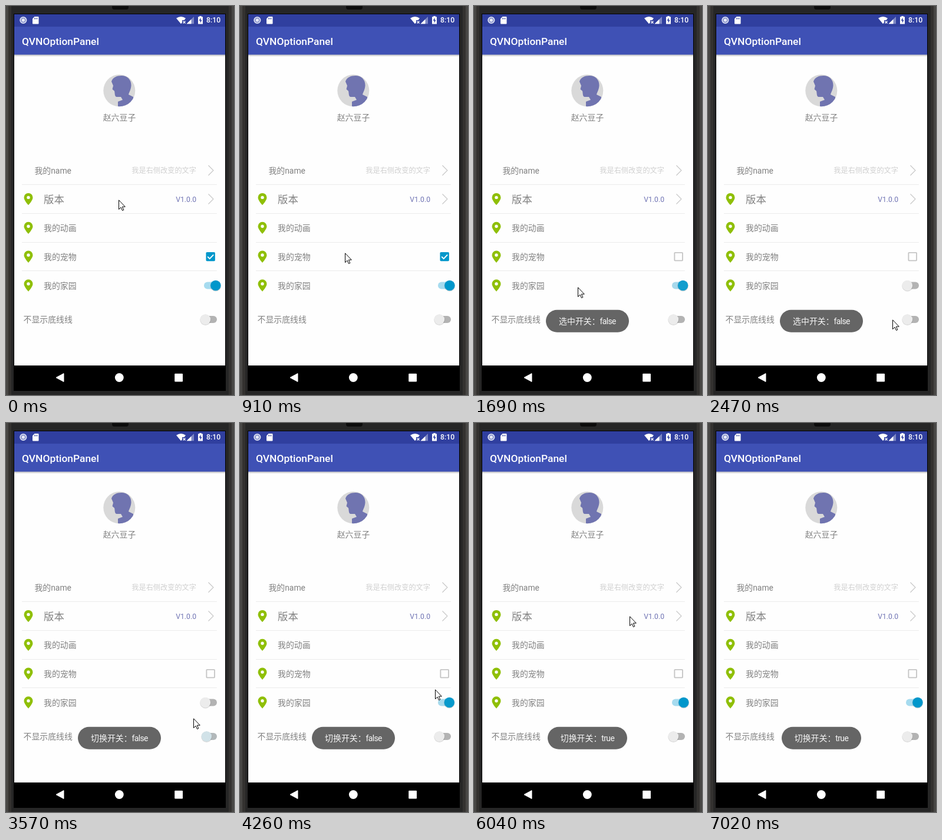
An HTML page that plays this animation: 387 by 659 pixels, repeating every 7.12 s.

```html
<!DOCTYPE html>
<html lang="zh-CN">
<head>
<meta charset="utf-8">
<title>Settings demo</title>
<style>
  html, body { margin: 0; width: 100%; height: 100%; overflow: hidden; background: #262626; }
  svg { display: block; width: 387px; height: 659px; }
  text { font: 13.9px Roboto, "Noto Sans CJK SC", "Noto Sans CJK", sans-serif; fill: #808080; }
  .title { font-size: 17.4px; font-weight: 500; fill: #fff; }
  .clock { font-size: 12.3px; font-weight: 500; fill: #fff; }
  .big { font-size: 17.4px; }
  .value { font-size: 12.2px; fill: #d0d0d0; text-anchor: end; }
  .version { fill: #7074b4; }
  .mid { text-anchor: middle; }
  .toast text { fill: #f6f6f6; text-anchor: middle; }
  .toast tspan { letter-spacing: -.6px; }
</style>
</head>
<body>
<svg viewBox="0 0 387 659" xmlns="http://www.w3.org/2000/svg">
  <defs>
    <linearGradient id="shade" x2="0" y2="1">
      <stop stop-color="#000" stop-opacity=".25"/>
      <stop offset="1" stop-color="#000" stop-opacity="0"/>
    </linearGradient>
    <clipPath id="round"><circle cx="192.3" cy="143.3" r="27"/></clipPath>
    <path id="pin" fill="#8fbf06" fill-rule="evenodd"
      d="M0 10.3C-2 8-7.5 1.5-7.5-2.6A7.5 7.5 0 0 1 7.5-2.6C7.5 1.5 2 8 0 10.3ZM0-5.3A2.7 2.7 0 0 0 0 .1A2.7 2.7 0 0 0 0-5.3Z"/>
    <path id="next" d="M343.5-8.5l8.5 8.5l-8.5 8.5" fill="none" stroke="#c6c6c6" stroke-width="1.1"/>
  </defs>

  <!-- phone body -->
  <rect width="387" height="659" fill="#262626"/>
  <path d="M0 0h4v659h-4zM383 0h4v659h-4z" fill="#474644"/>
  <path d="M4 0h5v659h-5zM378 0h5v659h-5z" fill="#343230"/>
  <rect x="180" y="-6" width="28" height="12" rx="4" fill="#0c0c0c"/>
  <rect x="13" y="13" width="360" height="639"/>
  <rect x="14" y="14" width="358" height="595" fill="#fefefe"/>

  <!-- status bar -->
  <rect x="14" y="14" width="358" height="21" fill="#303f9f"/>
  <circle cx="29.3" cy="24" r="5.2" fill="#7d88c6" stroke="#dce0f3" stroke-width="1.8"/>
  <circle cx="29.3" cy="24" r="2.7" fill="#e6e9f6"/>
  <path d="M48.5 18h6a1 1 0 0 1 1 1v10.5a1 1 0 0 1-1 1h-8.5a1 1 0 0 1-1-1v-8z" fill="#fff"/>
  <path d="M48.5 20v2.5M50.7 20v2.5M52.9 20v2.5" stroke="#303f9f"/>
  <path d="M289 20.8Q297 15 305 20.8L302.5 24H299v4L297 30.3Z" fill="#fff"/>
  <path d="M300.5 25.5l4 4m0-4l-4 4" stroke="#fff" stroke-width="1.2"/>
  <path d="M319 18v12.3h-12.5z" fill="#7e88c4"/>
  <path d="M314.5 22.4v7.9h-8z" fill="#fff"/>
  <path d="M328.3 18.3v-1.3h3.4v1.3h2.3v12.2h-8v-12.2z" fill="#fff"/>
  <path d="M330.6 19.8l-3 5h2v4l3-5h-2z" fill="#303f9f"/>
  <text class="clock" x="340" y="28.4">8:10</text>

  <!-- app bar -->
  <rect x="14" y="35" width="358" height="47.5" fill="#3f51b5"/>
  <rect x="14" y="82.5" width="358" height="3.5" fill="url(#shade)"/>
  <text class="title" x="27" y="66">QVNOptionPanel</text>

  <!-- profile -->
  <circle cx="192.3" cy="143.3" r="27" fill="#d9d9d9"/>
  <path clip-path="url(#round)" fill="#7074b0"
    d="M179 128C181 121 188 118 196 118C207 118 213 126 212.5 135C212 142 209 146 208 150L216 154V172H190V162L198 159L195 154H188C184 154 185 147 184 144L180.5 141L182 135Z"/>
  <text class="mid" x="192.5" y="193.7">赵六豆子</text>

  <!-- settings -->
  <text x="48.4" y="284">我的name</text>
  <text class="value" x="323" y="283.2">我是右侧改变的文字</text>
  <use href="#next" y="278.5"/>
  <text class="value version" x="323" y="331.7">V1.0.0</text>
  <use href="#next" y="327"/>
  <text x="29.5" y="536.3">不显示底线线</text>
  <g id="rows"></g>

  <g transform="translate(347.2 424.6)">
    <rect id="box" x="-7.7" y="-7.7" width="15.4" height="15.4" rx="1.7"/>
    <rect id="hole" x="-5.9" y="-5.9" width="11.8" height="11.8" fill="#fefefe"/>
    <path id="tick" d="M-5 0l3.5 3.5l6.5-6.8" fill="none" stroke="#fff" stroke-width="1.9"/>
  </g>

  <!-- navigation bar -->
  <path d="M85 629.5L98 622.5V636.5Z" fill="#fff" stroke="#fff" stroke-linejoin="round"/>
  <circle cx="192.3" cy="629.5" r="7.4" fill="#fff"/>
  <rect x="286.2" y="622.8" width="13.8" height="13.8" rx="1" fill="#fff"/>

  <g id="widgets"></g>

  <path id="cursor" fill="#fff" stroke="#000"
    d="M.5 .8V16.5L4.1 13.1L6.5 18.5L8.8 17.5L6.4 12.1H11.3Z"/>
</svg>
<script>
const LOOP = 7120, TICK = LOOP / 55;   // the screen refreshes 55 times per loop
const GLIDE = 260, FADE = 360, TOGGLE = 260, CHECK = 440;
const BLUE = [0, 151, 203], GREY = [196, 196, 196];

const $ = id => document.getElementById(id);
const clamp = v => Math.min(1, Math.max(0, v));
const lerp = (a, b, p) => a + (b - a) * p;
const mix = (a, b, p) => `rgb(${a.map((v, i) => Math.round(lerp(v, b[i], p)))})`;
const ease = (t, start, length) => {
  const u = clamp((t - start) / length);
  return u * u * (3 - 2 * u);
};
// Eased 0..1 state that flips at every click.
const toggled = (t, on, clicks, length) => clicks.reduce(
  (p, click, i) => p + (on === (i % 2 === 0) ? -1 : 1) * ease(t, click, length), on ? 1 : 0);

function make(parent, tag, attrs, content = '') {
  const el = document.createElementNS('http://www.w3.org/2000/svg', tag);
  for (const key in attrs) el.setAttribute(key, attrs[key]);
  el.textContent = content;
  return parent.appendChild(el);
}

['版本', '我的动画', '我的宠物', '我的家园'].forEach((label, i) => {
  const y = 327 + 48.8 * i, big = i === 0;
  make($('rows'), 'path', { d: `M27 ${Math.round(y - 25) + .5}H358`, stroke: '#ececec' });
  make($('rows'), 'use', { href: '#pin', x: 38, y });
  make($('rows'), 'text', { x: 64, y: y + (big ? 6.5 : 5.3), class: big ? 'big' : '' }, label);
});

function addSwitch(y, on, clicks) {
  const group = make($('widgets'), 'g', { transform: `translate(338.5 ${y})` });
  const track = make(group, 'rect', { x: -2.5, y: -6, width: 22, height: 12, rx: 6 });
  const knob = make(group, 'g', {});
  make(knob, 'circle', { cy: .7, r: 9.2, opacity: .15 });
  const thumb = make(knob, 'circle', { r: 8.7 });
  return t => {
    const p = toggled(t, on, clicks, TOGGLE);
    track.setAttribute('fill', mix([179, 179, 179], [166, 219, 239], p));
    thumb.setAttribute('fill', mix([236, 236, 236], BLUE, p));
    knob.setAttribute('transform', `translate(${17.4 * p} 0)`);
  };
}

// Toasts queue up: each one replaces the one before.
function addToast(label, value, index) {
  const start = 1150 + 1950 * index, end = start + 1950;
  const width = value === 'true' ? 135 : 141;
  const group = make($('widgets'), 'g', { class: 'toast' });
  make(group, 'rect', { x: 192.5 - width / 2, y: 514.8, width, height: 38, rx: 19, fill: '#656565' });
  make(make(group, 'text', { x: 192.5, y: 539 }, label + '：'), 'tspan', {}, value);
  return t => {
    const out = end < 6000 ? ease(t, end, FADE) : 0;
    group.setAttribute('opacity', ease(t, start, FADE) * (1 - out));
  };
}

// Unchecking turns the box grey, then opens its hole; checking runs backwards.
function drawCheckbox(t) {
  const p = toggled(t, true, [1020, 4420, 4780], CHECK);
  const solid = clamp(p * 2 - 1);
  $('box').setAttribute('fill', mix(GREY, BLUE, solid));
  $('tick').setAttribute('opacity', solid);
  $('hole').setAttribute('transform', `scale(${clamp(1 - p * 2)})`);
}

// Arrival time, x, y of each pointer stop.
const stops = [
  [0, 191, 328], [400, 189, 375], [910, 178, 419], [1290, 176, 476], [2190, 220, 559],
  [2460, 313, 531], [3490, 318, 501], [3690, 319, 479], [4250, 339, 431], [4660, 285, 429],
  [5300, 123, 429], [5700, 265, 321], [6160, 261, 348], [6300, 268, 557]
];

function drawCursor(t) {
  let [last, x, y] = stops[0];
  for (const [time, nx, ny] of stops.slice(1)) {
    const start = Math.max(last, time - GLIDE);
    const p = clamp((t - start) / (time - start));
    x = lerp(x, nx, p);
    y = lerp(y, ny, p);
    last = time;
  }
  $('cursor').setAttribute('transform', `translate(${Math.round(x)} ${Math.round(y)})`);
  $('cursor').setAttribute('opacity', t < 6440 ? 1 : 0);
}

const parts = [
  addSwitch(473.5, true, [1640, 3910]),
  addSwitch(531, false, [2600, 3290]),
  addToast('选中开关', 'false', 0),
  addToast('切换开关', 'false', 1),
  addToast('切换开关', 'true', 2),
  drawCheckbox,
  drawCursor
];

const begin = performance.now();
function frame() {
  const t = Math.floor((performance.now() - begin) % LOOP / TICK) * TICK;
  parts.forEach(draw => draw(t));
  requestAnimationFrame(frame);
}
frame();
</script>
</body>
</html>
```
